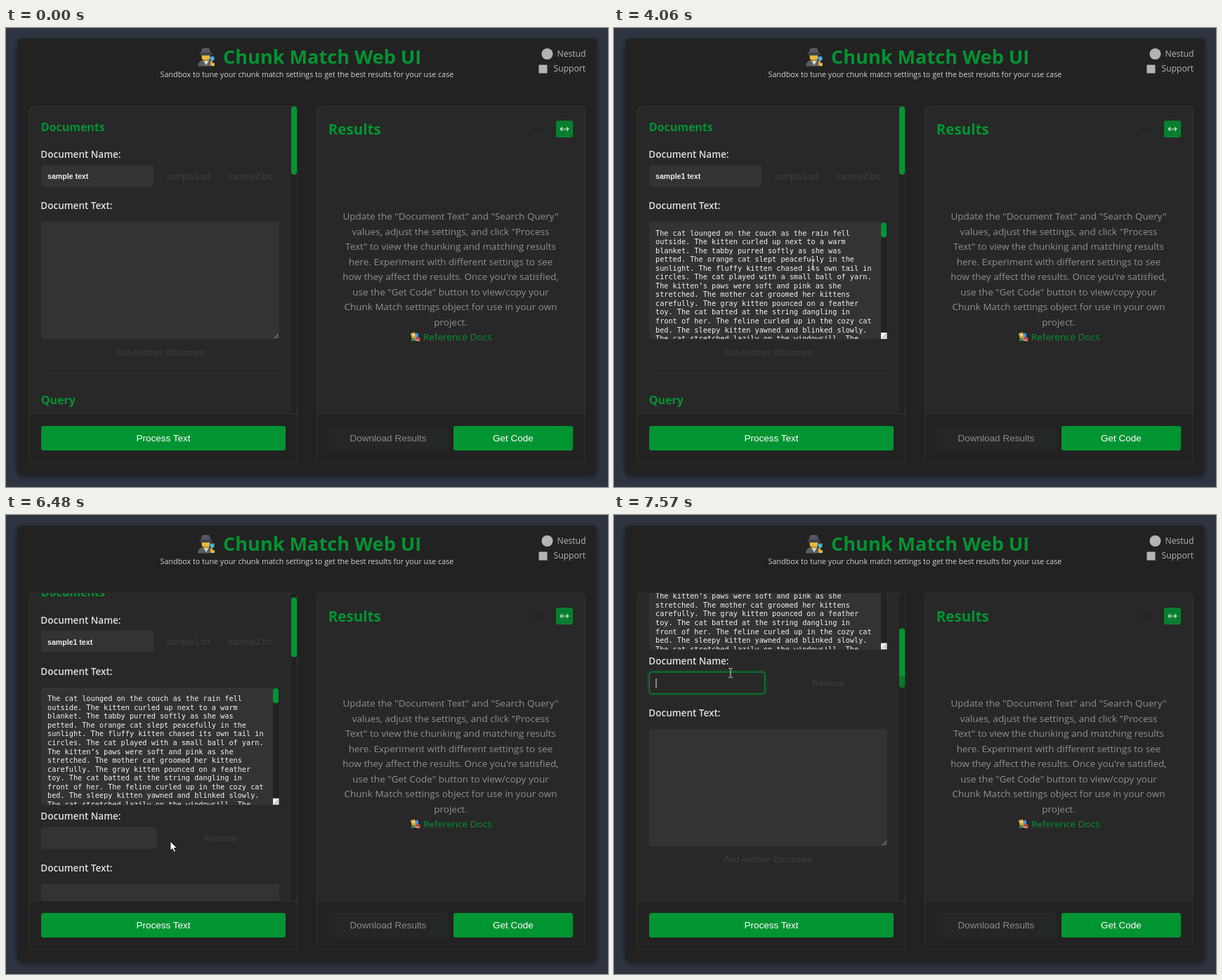
An HTML page that plays this animation: 857 px wide and 654 px high, repeating every 8 s.

```html
<!DOCTYPE html>
<html lang="en">
<head>
<meta charset="utf-8">
<title>Chunk Match Web UI</title>
<style>
  html, body { margin: 0; width: 100%; height: 100%; overflow: hidden; background: #2e3540; }
  svg { display: block; width: 857px; height: 654px; }
  text { font-family: "Open Sans", "Noto Sans", sans-serif; font-size: 13.5px; fill: #8f8f8f; white-space: pre; }
  .mid { text-anchor: middle; }
  .green { fill: #009432; }
  .h1 { font-size: 27.1px; font-weight: 700; fill: #009432; }
  .h2 { font-size: 20.6px; font-weight: 700; fill: #009432; }
  .h3 { font-size: 16px; font-weight: 700; fill: #009432; }
  .sub { font-size: 10.75px; fill: #d2d2d2; }
  .link { font-size: 12.17px; fill: #b4b4b4; }
  .label { font-weight: 600; fill: #dedede; }
  .btn, .ghost, .value, .tip { font-family: "Liberation Sans", Arial, sans-serif; }
  .btn { fill: #fff; }
  .ghost { font-size: 12.17px; fill: #3f3f3f; }
  .value { font-size: 10.6px; font-weight: 700; fill: #ececec; }
  .tip { font-size: 9.7px; fill: #fff; }
  .mono { font-family: "DejaVu Sans Mono", "Liberation Mono", monospace; font-size: 10.23px; fill: #f2f2f2; }
  .panel { fill: #282828; stroke: #333; }
  .field { fill: #333; }
  .line { stroke: #333; }
  .grip { stroke: #aaa; fill: none; }
</style>
</head>
<body>
<svg viewBox="0 0 857 654">
  <defs>
    <clipPath id="bodyClip"><rect x="33" y="111.5" width="373" height="437.5"/></clipPath>
    <clipPath id="areaClip"><rect x="50" y="276" width="330" height="167"/></clipPath>
    <filter id="shadow" x="-5%" y="-5%" width="110%" height="110%">
      <feDropShadow dx="0" dy="2" stdDeviation="4" flood-color="#000" flood-opacity=".45"/>
    </filter>
    <filter id="glow" x="-10%" y="-50%" width="120%" height="200%"><feGaussianBlur stdDeviation="1.5"/></filter>
  </defs>

  <rect width="857" height="654" fill="#2e3540"/>
  <rect x="16" y="15" width="825" height="622" rx="6" fill="#222" filter="url(#shadow)"/>

  <!-- header -->
  <g id="sleuth">
    <path d="M273 54.500q1-8 7-8.500h9q6 1 7 8.500z" fill="#5b5e63"/>
    <path d="M281 46l4 7 4-7z" fill="#d9dde0"/>
    <circle cx="284.500" cy="41.500" r="6" fill="#e9b83c"/>
    <path d="M280 43.500q4.500 4 9 0l-1 3.500h-7z" fill="#b98523"/>
    <path d="M277 36l2-6.500q2-2 5.500-.5 3-1.500 5 .5l2 6.500z" fill="#55585f"/>
    <path d="M274 36.500q10.500-4 21 0-3 3.500-10.500 2.500-7.500 1-10.500-2.500z" fill="#414449"/>
    <path d="M293 46l-1 7" stroke="#d9a531" stroke-width="3"/>
    <circle cx="293.500" cy="43.500" r="3.200" fill="#48b6e8" stroke="#2e6885"/>
    <path d="M292 50h5v4h-5z" fill="#e5b73f"/>
  </g>
  <text class="h1" x="309" y="51">Chunk Match Web UI</text>
  <text class="sub mid" x="428.500" y="70">Sandbox to tune your chunk match settings to get the best results for your use case</text>
  <circle cx="770.500" cy="37" r="8" fill="#b4b4b4"/>
  <text class="link" x="784.500" y="41">Nestud</text>
  <rect x="758.500" y="52.500" width="12" height="12" fill="#b4b4b4"/>
  <text class="link" x="779.500" y="62">Support</text>

  <!-- results panel -->
  <rect class="panel" x="442.500" y="111.500" width="381.500" height="507.500" rx="5"/>
  <path d="M443 549.500h380.500V614q0 4.500-4.500 4.500H447.500q-4.500 0-4.500-4.500z" fill="#222"/>
  <path class="line" d="M443 549.500h381"/>
  <text class="h2" x="458.700" y="152">Results</text>
  <rect x="751" y="142" width="12" height="5" rx="2" fill="#222"/>
  <rect x="783" y="132" width="24" height="24" rx="3" fill="#097e31"/>
  <path d="M789.500 144h11M792 141.200l-2.800 2.800 2.800 2.800M798 141.200l2.800 2.800-2.800 2.800" fill="none" stroke="#dfe9e1" stroke-width="1.100"/>
  <g id="help"></g>
  <g id="books">
    <path d="M576 435l6-1.500 2.500 10-6 1.500z" fill="#d8a93a"/>
    <path d="M578 436.500l4-1 .6 2.500-4 1z" fill="#f0dd9a"/>
    <path d="M577 442h5v4h-5z" fill="#2d8a52"/>
    <path d="M583 435h4v10h-4z" fill="#3b9bd0"/>
    <path d="M584 440l6 1.500-1 5.500-8-2z" fill="#c84a3c"/>
    <path d="M582 444l6 1.500" stroke="#e8e2d4"/>
  </g>
  <text class="green" x="594" y="445">Reference Docs</text>
  <rect x="460" y="567" width="170" height="35" rx="3" fill="#252626"/>
  <text class="btn mid" x="544" y="588.500" style="fill:#8a8a8a">Download Results</text>
  <rect class="green" x="637" y="567" width="170" height="35" rx="3"/>
  <text class="btn mid" x="722" y="588.500">Get Code</text>

  <!-- documents panel -->
  <rect class="panel" x="33.500" y="111.500" width="381" height="507.500" rx="5"/>
  <path d="M34 549.500h380V614q0 4.500-4.500 4.500H38.500q-4.500 0-4.500-4.500z" fill="#222"/>
  <path d="M406 112h4q4 0 4 4v433h-8z" fill="#222"/>
  <g clip-path="url(#bodyClip)"><g id="content">
    <text class="h3" x="49.700" y="146.500">Documents</text>
    <text class="label" x="49.300" y="185">Document Name:</text>
    <rect class="field" x="50" y="195" width="160" height="31" rx="3"/>
    <text class="value" id="docName" x="59" y="215"></text>
    <rect id="sampleBg" x="218.500" y="199" width="81.500" height="25" rx="3" fill="#1f1f1f"/>
    <text class="ghost mid" id="sample" x="259.500" y="215.500">sample1.txt</text>
    <text class="ghost mid" x="347" y="215.500">sample2.txt</text>
    <text class="label" x="49.300" y="258">Document Text:</text>
    <rect class="field" x="50" y="276" width="339" height="167.500" rx="3"/>
    <path class="grip" id="grip" d="M382 442l6-6M385.500 442l2.500-2.500"/>
    <g id="story">
      <rect x="380" y="276" width="8.500" height="158" fill="#222"/>
      <rect class="green" x="380" y="277" width="8" height="21.500" rx="4"/>
      <rect x="380" y="434" width="8.500" height="9" fill="#f4f4f4"/>
      <path d="M382 442l6-6M385.500 442l2.500-2.500" stroke="#777"/>
      <g id="lines" clip-path="url(#areaClip)"></g>
    </g>
    <g id="second">
      <text class="label" x="49.300" y="464.500">Document Name:</text>
      <rect class="field" x="50" y="475" width="164.500" height="31" rx="3"/>
      <g id="focus">
        <rect x="50" y="475" width="164.500" height="31" rx="3" fill="none" stroke="#009432" stroke-width="2.500" opacity=".55" filter="url(#glow)"/>
        <rect x="50.500" y="475.500" width="164" height="30.500" rx="3" fill="#282828" stroke="#009432"/>
        <path id="caret" d="M60 484.500v13" stroke="#e6e6e6"/>
      </g>
      <text class="ghost mid" x="305.500" y="495">Remove</text>
      <text class="label" x="49.300" y="538.500">Document Text:</text>
      <rect class="field" x="50" y="556" width="339" height="167.500" rx="3"/>
      <path class="grip" d="M382 722l6-6M385.500 722l2.500-2.500"/>
    </g>
    <g id="tail">
      <text class="ghost mid" id="add" x="219.500" y="466.500">Add Another Document</text>
      <path class="line" d="M50 491.500h339"/>
      <text class="h3" x="49.700" y="536">Query</text>
    </g>
  </g></g>
  <path class="line" d="M34 549.500h380"/>
  <rect class="green" id="thumb" x="406" y="111.500" width="8" rx="4"/>
  <rect x="406" y="230" width="8" height="16" fill="#222" opacity=".25"/>
  <rect class="green" x="50" y="567" width="348" height="35" rx="3"/>
  <text class="btn mid" x="224" y="588.500">Process Text</text>

  <g id="tooltip">
    <rect x="188.500" y="177.500" width="142" height="17.500" rx="3" fill="#1d1d1d" stroke="#333"/>
    <text class="tip" x="195" y="189.500">load example text document 1</text>
  </g>

  <g id="cursor">
    <circle id="click" r="10" fill="#d6c800" opacity=".8"/>
    <path id="arrow" d="M0 0v13.200l3-2.800 2.200 5 2.300-1-2.200-4.900h4.200z" fill="#fff" stroke="#111" stroke-width=".9"/>
    <path id="hand" d="M-1.500 1.500q1.500-2.500 3 0v5.500l6 1.300q1.600.4 1.500 2.200l-.5 4.500-1.500 4h-7l-5-6.500q-.6-2 1.500-1.700l2 1.700z" fill="#fff" stroke="#111" stroke-width=".9"/>
    <path id="beam" d="M-3-6.500h2l1 1 1-1h2M-3 6.500h2l1-1 1 1h2M0-5.500v11" fill="none" stroke="#d8d8d8"/>
  </g>
</svg>

<script>
const LOOP = 8000;
const GROWTH = 280;      // height of the second document block
const $ = id => document.getElementById(id);

const story = `The cat lounged on the couch as the rain fell
outside. The kitten curled up next to a warm
blanket. The tabby purred softly as she was
petted. The orange cat slept peacefully in the
sunlight. The fluffy kitten chased its own tail in
circles. The cat played with a small ball of yarn.
The kitten’s paws were soft and pink as she
stretched. The mother cat groomed her kittens
carefully. The gray kitten pounced on a feather
toy. The cat batted at the string dangling in
front of her. The feline curled up in the cozy cat
bed. The sleepy kitten yawned and blinked slowly.
The cat stretched lazily on the windowsill. The`;

const help = `Update the "Document Text" and "Search Query"
values, adjust the settings, and click "Process
Text" to view the chunking and matching results
here. Experiment with different settings to see
how they affect the results. Once you're satisfied,
use the "Get Code" button to view/copy your
Chunk Match settings object for use in your own
project.`;

function addLines(parent, text, cls, x, y, step) {
  text.split("\n").forEach((line, i) => {
    const el = document.createElementNS("http://www.w3.org/2000/svg", "text");
    el.setAttribute("class", cls);
    el.setAttribute("x", x);
    el.setAttribute("y", y + i * step);
    el.textContent = line;
    parent.append(el);
  });
}
addLines($("lines"), story, "mono", 59, 295.5, 12.55);
addLines($("help"), help, "mid", 633, 273, 21.5);

// rows of [time, ...values]
const path = [
  [1490, 701, 151], [1625, 610, 172], [1760, 500, 204], [1900, 385, 227], [2030, 303, 228],
  [2166, 271, 222], [2300, 260, 217], [3600, 260, 217], [3720, 268, 238], [3860, 278, 280],
  [4059, 283, 337], [4200, 274, 395], [4400, 252, 451], [4600, 241, 460], [4940, 234, 465],
  [6560, 234, 465], [6763, 232, 453], [6900, 220, 410], [7035, 198, 335], [7160, 178, 268],
  [7235, 172, 244], [7365, 166, 225]
];
const scrolling = [
  [6350, 0], [6425, 7], [6492, 30], [6560, 76], [6628, 131], [6695, 180], [6763, 217],
  [6830, 238], [6898, 248], [6966, 251.5]
];
const shapes = [
  [0, "none"], [1485, "arrow"], [2080, "hand"], [3730, "arrow"], [3870, "beam"],
  [4470, "hand"], [5890, "arrow"], [6600, "beam"], [7090, "arrow"], [7225, "beam"]
];

function tween(rows, t) {
  const i = rows.findIndex(r => r[0] > t);
  if (i === 0) return rows[0].slice(1);
  if (i < 0) return rows[rows.length - 1].slice(1);
  const a = rows[i - 1], b = rows[i], p = (t - a[0]) / (b[0] - a[0]);
  return a.slice(1).map((v, k) => v + (b[k + 1] - v) * p);
}
const ramp = (t, a, b) => Math.min(1, Math.max(0, (t - a) / (b - a)));
const pulse = (t, a, b, c, d) => ramp(t, a, b) - ramp(t, c, d);
const within = (t, a, b) => t >= a && t < b;
const show = (id, on) => $(id).style.display = on ? "" : "none";
const shift = (id, x, y) => $(id).setAttribute("transform", `translate(${x} ${y})`);
const grey = p => { const v = Math.round(63 + 192 * p); return `rgb(${v},${v},${v})`; };

function render(t) {
  const tick = 1490 + Math.floor((t - 1490 + 16) / 67.6) * 67.6;
  const [x, y] = tween(path, tick);
  const [scroll] = tween(scrolling, tick);
  const loaded = t >= 3060, added = t >= 5890;

  shift("cursor", x, y);
  const shape = shapes.filter(s => s[0] <= t).pop()[1];
  for (const s of ["arrow", "hand", "beam"]) show(s, s === shape);
  show("click", within(t, 2920, 3060) || within(t, 5760, 5890) || within(t, 7510, 7570));

  const hover = pulse(tick, 2030, 2180, 3690, 3830);
  $("sampleBg").style.opacity = hover;
  $("sample").style.fill = grey(hover);
  $("tooltip").style.opacity = pulse(tick, 2110, 2310, 3640, 3770);
  $("add").style.fill = grey(added ? 0 : ramp(tick, 4440, 4640));

  $("docName").textContent = loaded ? "sample1 text" : "sample text";
  show("story", loaded);
  show("grip", !loaded);
  show("second", added);
  shift("tail", 0, added ? GROWTH : 0);
  shift("content", 0, -scroll);
  shift("thumb", 0, scroll * 0.198);
  $("thumb").setAttribute("height", added ? 85 : 97.5);
  show("focus", t >= 7510);
  show("caret", t >= 7510);
}

const start = performance.now();
function frame() {
  render((performance.now() - start) % LOOP);
  requestAnimationFrame(frame);
}
frame();
</script>
</body>
</html>
```
